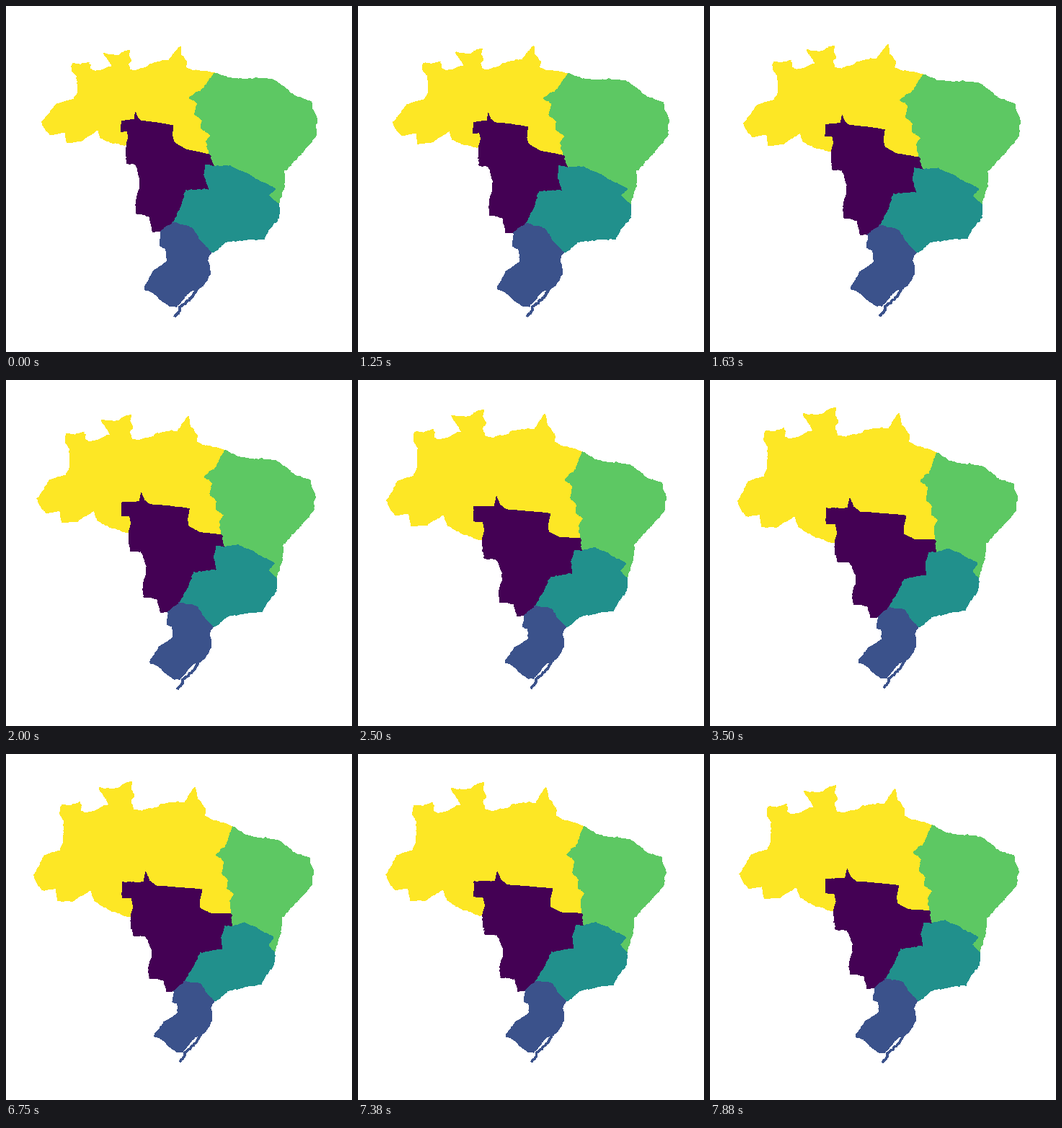
These frames come from a looping animation (480x480 px, 8000 ms). A matplotlib script:

```python
import numpy as np
import matplotlib.pyplot as plt
from matplotlib.animation import FuncAnimation
from matplotlib.patches import Polygon

SIZE, DPI = 480, 100
FRAMES, STEP_MS = 64, 125
MORPH, GROW_AT, SHRINK_AT = 25, 3, 53
YELLOW, GREEN, TEAL, BLUE, PURPLE = (
    "#FDE725", "#5DC863", "#21908C", "#3B528B", "#440154")

rng = np.random.default_rng(11)


def crinkle(a, b, rough):
    """Fractal line from a to b, without a itself."""
    d = b - a
    length = np.hypot(*d)
    if length < 3:
        return [b]
    push = rng.normal(0, rough) + np.sign(rng.normal()) * rough / 2
    mid = (a + b) / 2 + np.array([-d[1], d[0]]) / length * push
    return crinkle(a, mid, rough) + crinkle(mid, b, rough)


def arc(*points, rough=0.4):
    pts = np.array(points, float)
    out = [pts[0]]
    for a, b in zip(pts[:-1], pts[1:]):
        out += crinkle(a, b, rough)
    return np.array(out)


def ring(*arcs):
    return np.vstack(arcs)


def ribbon(line, half):
    """Closed outline around a centre line."""
    d = np.gradient(line, axis=0)
    side = np.stack([-d[:, 1], d[:, 0]], 1) / np.hypot(*d.T)[:, None] * half
    return ring(line + side, (line - side)[::-1])


# Points where areas meet in the enlarged shape
NE, ES, SES = (315, 101), (373, 276), (289, 343)
NM, NME, MES = (173, 226), (312, 222), (314, 240)
MSS, MS, S_TIP = (247, 316), (233, 329), (206, 391)

# How far some of the points lie away in the plain shape
SHIFTS = {
    NE: (-25, -8), ES: (6, 0), SES: (-4, -1), NM: (-6, -33),
    NME: (-30, -16), MES: (-25, -17), MSS: (-16, -16), MS: (-19, -16),
    S_TIP: (-14, 1), (262, 46): (-20, 10), (175, 38): (-3, 23),
    (77, 71): (15, 9), (79, 124): (20, -3), (38, 168): (11, -7),
    (72, 204): (12, -14), (161, 178): (-1, -18), (272, 188): (-40, -22),
    (292, 140): (-38, -13), (378, 120): (-8, -18), (427, 165): (5, -6),
    (383, 226): (3, 2), (354, 320): (4, 4), (241, 427): (-7, 4),
}


def bend(a, b):
    r2 = ((a[:, None] - b[None]) ** 2).sum(-1)
    return r2 * np.log(r2 + 1e-9)


def spline_warp(shifts):
    """Thin-plate spline that carries every anchor by its shift."""
    at = np.array(list(shifts), float) / SIZE
    n = len(at)
    flat = np.c_[np.ones(n), at]
    system = np.block([[bend(at, at), flat], [flat.T, np.zeros((3, 3))]])
    goal = np.vstack([np.array(list(shifts.values()), float),
                      np.zeros((3, 2))])
    weights = np.linalg.solve(system, goal)

    def warp(pts):
        p = pts / SIZE
        return pts + np.c_[bend(p, at), np.ones(len(p)), p] @ weights

    return warp


north_coast = arc(
    NE, (283, 90), (276, 86), (276, 75), (266, 63), (262, 46), (248, 68),
    (240, 67), (216, 69), (212, 73), (188, 79), (177, 77), (173, 65),
    (178, 57), (173, 47), (175, 38), (161, 43), (155, 48), (129, 47),
    (137, 60), (143, 70), (127, 77), (112, 82), (104, 79), (103, 67),
    (91, 71), (77, 71))
west_coast = arc(
    (77, 71), (75, 84), (81, 93), (79, 124), (75, 134), (53, 141),
    (45, 157), (38, 168), (47, 184), (51, 189), (69, 187), (72, 204),
    (93, 204), (118, 189), (124, 205), (145, 217), NM)
north_mid = arc(
    NM, (177, 212), (174, 200), (161, 199), (161, 178), (191, 178),
    (194, 164), (199, 176), (208, 183), (272, 188), (268, 205), (269, 214),
    (283, 221), NME, rough=0.1)
north_east = arc(
    NE, (304, 130), (292, 140), (302, 148), (300, 165), (309, 175),
    (307, 186), (317, 194), (311, 204), NME)
mid_west = arc(
    NM, (174, 240), (177, 252), (193, 252), (202, 270), (202, 284),
    (198, 296), (199, 311), (218, 313), (223, 330), MS)
mid_east = arc(NME, MES)
mid_se = arc(MES, (304, 239), (299, 255), (300, 272), (270, 276),
             (258, 300), MSS)
mid_south = arc(MS, MSS)
east_coast = arc(
    NE, (331, 112), (352, 117), (378, 120), (401, 138), (421, 144),
    (427, 165), (423, 183), (402, 206), (391, 219), (383, 226), (381, 249),
    ES)
east_se = arc(MES, (331, 234), (349, 242), (371, 255), (363, 265), ES)
se_coast = arc(ES, (372, 292), (361, 306), (354, 320), (331, 323),
               (307, 329), SES)
se_south = arc(MSS, (270, 319), (277, 331), SES)
south_coast = arc(
    SES, (284, 352), (286, 367), (278, 383), (269, 391), (262, 393),
    (252, 405), (244, 414), (236, 413), (219, 398), S_TIP)
south_west = arc(S_TIP, (219, 372), (238, 360), (238, 348), (231, 344), MS)
spit = ribbon(arc((269, 391), (263, 401), (250, 413), (241, 427)), 1.2)

areas = [
    (YELLOW, ring(north_coast, west_coast, north_mid, north_east[::-1])),
    (GREEN, ring(east_coast, east_se[::-1], mid_east[::-1],
                 north_east[::-1])),
    (PURPLE, ring(north_mid, mid_east, mid_se, mid_south[::-1],
                  mid_west[::-1])),
    (TEAL, ring(east_se, se_coast, se_south[::-1], mid_se[::-1])),
    (BLUE, ring(se_south, south_coast, south_west, mid_south)),
    (BLUE, spit),
]

fig = plt.figure(figsize=(SIZE / DPI, SIZE / DPI), dpi=DPI, facecolor="white")
ax = fig.add_axes([0, 0, 1, 1])
ax.set(xlim=(0, SIZE), ylim=(SIZE, 0))
ax.axis("off")

warp = spline_warp(SHIFTS)
shapes = []
for color, grown in areas:
    patch = Polygon(grown, closed=True, facecolor=color, edgecolor="none",
                    lw=0, antialiased=False, snap=False)
    shapes.append((ax.add_patch(patch), warp(grown), grown))


def cubic_in_out(t):
    t = min(max(t, 0), 1)
    return 4 * t**3 if t < 0.5 else 1 - 4 * (1 - t)**3


def update(i):
    mix = (cubic_in_out((i - GROW_AT) / MORPH)
           - cubic_in_out((i - SHRINK_AT) / MORPH))
    for patch, plain, grown in shapes:
        patch.set_xy(plain + (grown - plain) * mix)
    return [s[0] for s in shapes]


anim = FuncAnimation(fig, update, frames=FRAMES, interval=STEP_MS,
                     repeat=True, repeat_delay=0)
plt.show()
```
